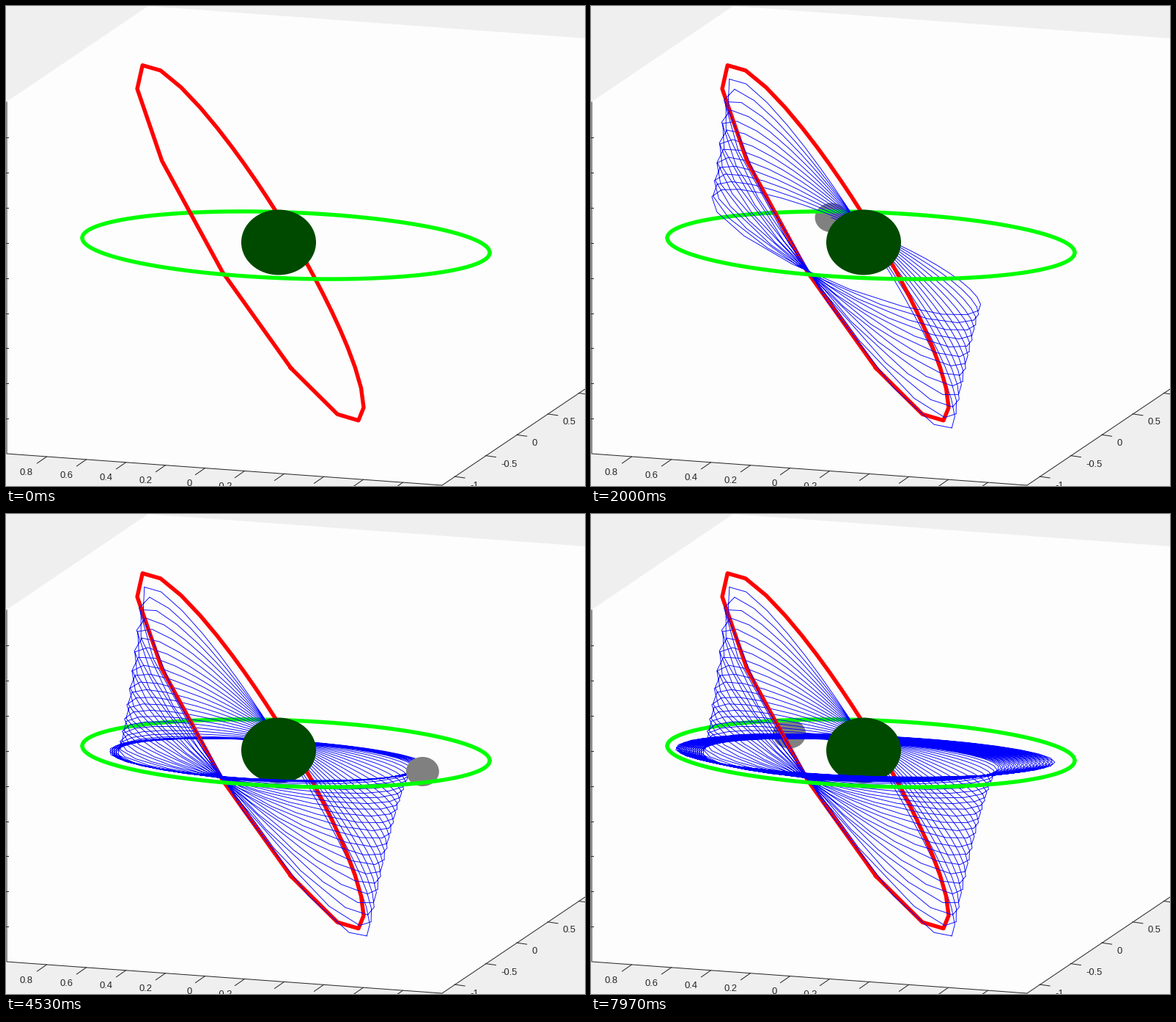
Animation, 790 px wide and 654 px high, one loop 8 s. Source, as a matplotlib script:

```python
import numpy as np
import matplotlib.pyplot as plt
from matplotlib.animation import FuncAnimation
from matplotlib.patches import Ellipse, Polygon

W, H, DPI = 790, 654, 100
PX = 72 / DPI
FRAMES, INTERVAL = 400, 20      # one 8 s loop
STATES, STEPS = 240, 6          # craft positions, path vertices per position
INK = "#262626"

fig = plt.figure(figsize=(W / DPI, H / DPI), dpi=DPI, facecolor="#efefef")
ax = fig.add_axes([0, 0, 1, 1])
ax.set_xlim(0, W)
ax.set_ylim(H, 0)
ax.axis("off")


def line(x, y, color, width, z, **kw):
    return ax.plot(x, y, color=color, lw=width * PX, zorder=z, **kw)[0]


def label(x, y, value, align):
    ax.text(x, y, f"{value:.1f}".replace(".0", ""), ha=align, va="center",
            family="Liberation Sans", size=13 * PX, color=INK, zorder=1)


def eccentric(nu, k):
    """Ellipse parameter for a true anomaly; k = sqrt((1+e)/(1-e))."""
    return 2 * np.arctan2(np.sin(nu / 2), k * np.cos(nu / 2))


def split(x, y, side):
    """Keep only the segments whose ends lie mostly on the positive side."""
    seg = side[:-1] + side[1:] > 0
    keep = np.r_[seg, False] | np.r_[False, seg]
    return np.where(keep, x, np.nan), np.where(keep, y, np.nan)


# Axes box with its ticks and labels
ax.add_patch(Polygon([(0, 131), (194, 0), (W, 44), (W, 522), (595, 653),
                      (0, 610)], fc="#fdfdfd", ec="none", zorder=0))
line([1, 1, 595, W], [131, 610, 653, 522], INK, 1, 1)
for i in range(9):
    y = 179 + 47.9 * i
    line([0, 3], [y, y], INK, 1, 1)
for i in range(10):
    x = 55.5 + 54 * i
    y = 610 + 0.0723 * x
    line([x, x - 13], [y, y + 9], INK, 1, 1)
for i in range(5):
    x, y = 612 + 42.3 * i, 641 - 28.4 * i
    line([x, x + 14], [y, y + 2], INK, 1, 1)
for i in range(6):
    label(37 + 54.3 * i, 636 + 3.75 * i, (4 - i) / 5, "right")
for i in range(4):
    label(759 - 42 * i, 567.5 + 28.7 * i, (1 - i) / 2, "left")

# Starting orbit
E = eccentric(np.radians(164 + 360 / 28 * np.arange(29)), 2.9)
line(333 + 61 * np.cos(E) + 142.5 * np.sin(E),
     323 - np.cos(E) + 243 * np.sin(E), "#ff0000", 5.4, 3,
     solid_joinstyle="round")

# Final orbit, far half behind and near half in front
for start, z in [(np.pi, 1.5), (0, 6)]:
    t = start + np.linspace(0, np.pi, 60)
    line(382 + 278 * np.cos(t), 326 + 10 * np.cos(t) + 45 * np.sin(t),
         "#00ff00", 5.4, z, solid_capstyle="round")

ax.add_patch(Ellipse((372, 322), 102, 89, fc="#004a00", ec="none", zorder=4))

# Transfer path: the orbit flattens first, then widens and rounds out
angle = 30 + 78.45 * np.arange((STATES - 1) * STEPS + 1) / STEPS
rev = angle / 360
tilt = np.clip(1 - rev / 22, 0, 1) ** 1.5
roundness = 1.1 + 1.8 * np.exp(-rev / 17)
psi = eccentric(-np.radians(angle), roundness) - np.radians(170)
near = np.cos(psi)
along = np.where(near > 0, near, 0.86 * near)     # perspective shortening
across = np.sin(psi)
px = (340 + 0.69 * rev - along * (43 + 0.9 * rev)
      - across * (150 + 2.2 * rev - 0.007 * rev ** 2))
py = 339 - 0.22 * rev + along * 25 - across * (18 + 228 * tilt)

halves = [split(px, py, -near), split(px, py, near)]
trails = [line([], [], "#0000ff", 0.9, z) for z in (2, 5)]
craft = Ellipse((0, 0), 45, 40, fc="#808080", ec="none")
ax.add_patch(craft)


def update(frame):
    i = round(frame * STATES / FRAMES) * STEPS
    for trail, (x, y) in zip(trails, halves):
        trail.set_data(x[:i + 1], y[:i + 1])
    craft.center = px[i], py[i]
    craft.set_zorder(5.5 if near[i] > 0 else 1.2)
    return [*trails, craft]


anim = FuncAnimation(fig, update, frames=FRAMES, interval=INTERVAL,
                     init_func=lambda: update(0), repeat=True,
                     repeat_delay=0, blit=False)
plt.show()
```
